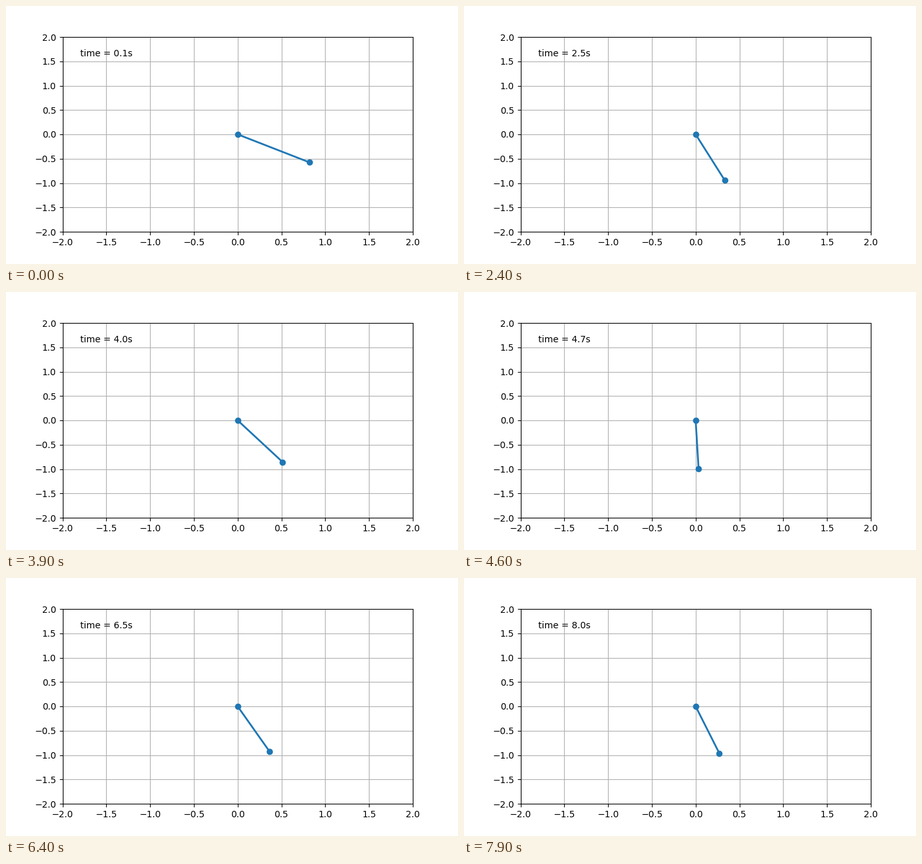
A matplotlib script that plays this animation: 700 px wide and 400 px high, repeating every 8000 ms.

```python
import numpy as np
import matplotlib.pyplot as plt
from matplotlib.animation import FuncAnimation

G = 9.8          # gravity
DAMPING = 0.2
LENGTH = 1.0
DT = 0.1         # seconds per frame
FRAMES = 80
SUBSTEPS = 20


def slope(state):
    theta, omega = state
    return np.array([omega, -G / LENGTH * np.sin(theta) - DAMPING * omega])


def rk4(state, h):
    k1 = slope(state)
    k2 = slope(state + h / 2 * k1)
    k3 = slope(state + h / 2 * k2)
    k4 = slope(state + h * k3)
    return state + h / 6 * (k1 + 2 * k2 + 2 * k3 + k4)


def swing():
    """Angle of the damped pendulum at DT, 2*DT, ..."""
    state = np.array([1.0, 0.0])
    angles = []
    for _ in range(FRAMES):
        for _ in range(SUBSTEPS):
            state = rk4(state, DT / SUBSTEPS)
        angles.append(state[0])
    return np.array(angles)


theta = swing()

fig = plt.figure(figsize=(7, 4), dpi=100)
fig.subplots_adjust(left=0.125, right=0.9, bottom=0.125, top=0.88)
ax = fig.add_subplot(111, xlim=(-2, 2), ylim=(-2, 2))
ticks = np.arange(-2, 2.1, 0.5)
ax.set_xticks(ticks)
ax.set_yticks(ticks)
ax.grid()

rod, = ax.plot([], [], "o-", lw=2)
clock = ax.text(0.05, 0.9, "", transform=ax.transAxes)


def update(i):
    rod.set_data([0, LENGTH * np.sin(theta[i])],
                 [0, -LENGTH * np.cos(theta[i])])
    clock.set_text(f"time = {(i + 1) * DT:.1f}s")
    return rod, clock


anim = FuncAnimation(fig, update, frames=FRAMES, interval=1000 * DT,
                     repeat=True, repeat_delay=0, blit=False)
plt.show()
```
